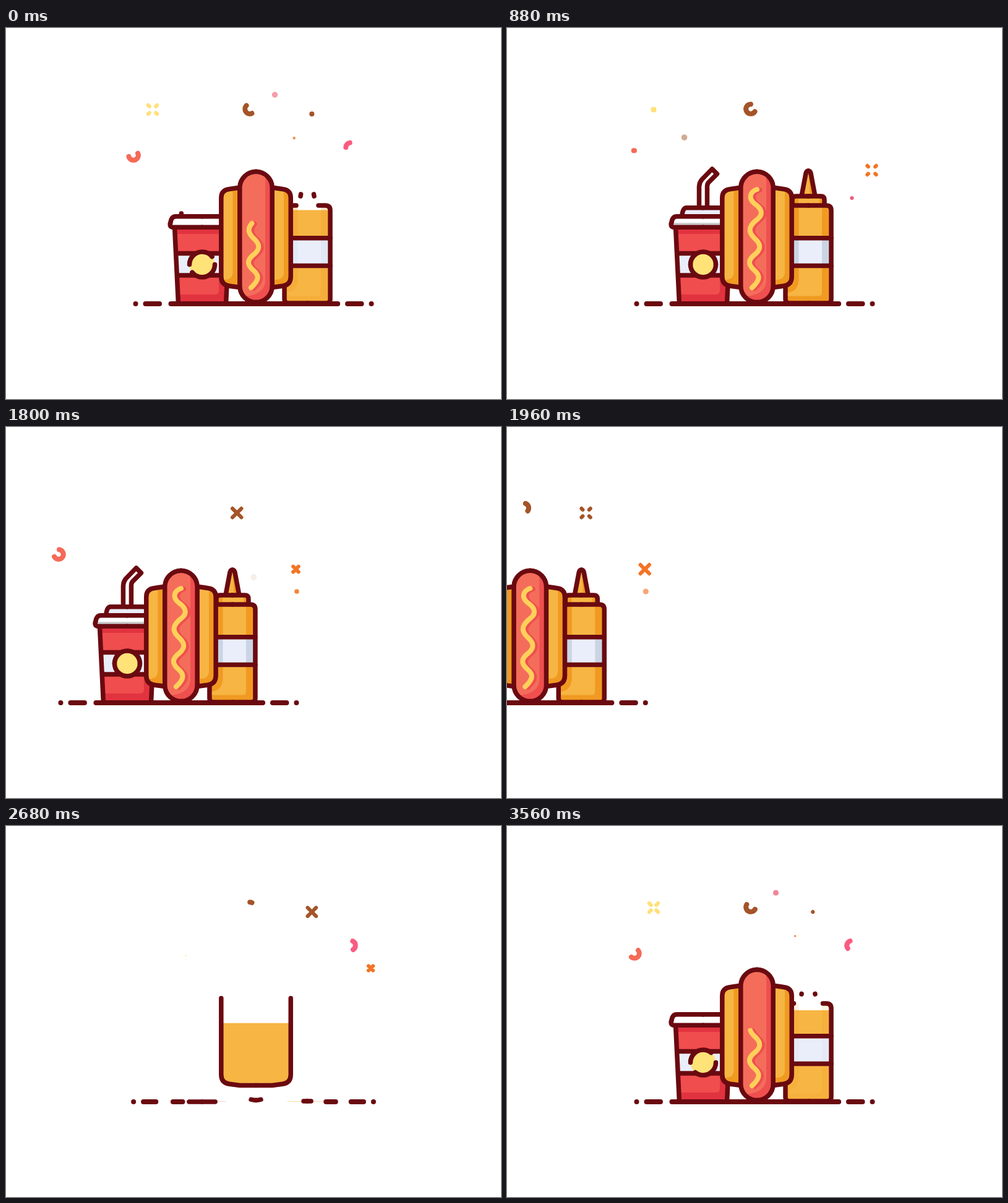
Animation, 800 px wide and 600 px high, one loop 3.6 s. Source, as an HTML page:

```html
<!DOCTYPE html>
<html lang="en">
<head>
<meta charset="utf-8">
<title>Hot dog lunch</title>
<style>
  html, body { margin: 0; width: 100%; height: 100%; overflow: hidden; background: #fff; }
  svg { display: block; width: 800px; height: 600px; }
  .ink { fill: none; stroke: #6a0a10; stroke-width: 7.5; stroke-linecap: round; stroke-linejoin: round; }
  .ground { stroke-width: 8; }
  .bun { fill: #f7b543; } .bun2 { fill: #f09a22; }
  .dog { fill: #f46d5b; } .dog2 { fill: #ef4f4f; }
  .red { fill: #f04d4e; } .red2 { fill: #e1333f; }
  .pale { fill: #eaeefa; } .pale2 { fill: #cad5e4; }
  .sauce { fill: none; stroke: #ffd05a; stroke-width: 8; stroke-linecap: round; }
</style>
</head>
<body>
<svg viewBox="0 0 800 600">
  <defs>
    <clipPath id="bun"><path d="M378 419.5H430L447 417.3Q460.2 415.5 460.2 402V275Q460.2 262 447 260.5L430 258H378L361 260.5Q347.8 262 347.8 275V402Q347.8 415.5 361 417.3Z"/></clipPath>
    <clipPath id="dog"><rect x="377.8" y="232.3" width="52.4" height="211.2" rx="26.2"/></clipPath>
    <clipPath id="cup"><path d="M272.5 322H361.5L355.5 446H278.5Z"/></clipPath>
    <clipPath id="cupLevel"><rect x="260" y="322" width="120" height="124" data-rise="2680 3290"/></clipPath>
    <clipPath id="bottle"><rect x="450" y="287" width="74" height="159" rx="7"/></clipPath>
    <clipPath id="bottleLevel"><rect x="440" y="287" width="100" height="161" data-rise="2670 3740 1.5"/></clipPath>
    <clipPath id="nozzle"><path d="M476 272L483 235Q484 231 487 231Q490 231 491 235L498 272Z"/></clipPath>
  </defs>
  <g id="scene">
    <g id="confetti"></g>

    <!-- drink -->
    <path class="ink" data-draw="4000 4400" d="M310.5 290V258Q310.5 250 315 245L331.5 228L339.5 236L326 249.500Q323.500 252 323.500 257V290"/>
    <path class="pale" data-fade="3700 4000" d="M283 304Q284 291 290 290.700H351V304Z"/>
    <path class="ink" data-mir="317" data-draw="3580 3900" d="M283 303Q284 291 290 290.700H317"/>
    <g clip-path="url(#cup)">
      <g clip-path="url(#cupLevel)">
        <rect class="red" x="260" y="320" width="120" height="130"/>
        <rect class="pale" x="260" y="364.500" width="120" height="35.500"/>
      </g>
      <g data-fade="3250 3500">
        <path class="red2" d="M260 320H380V364H344V333H260ZM344 400H380V446H260V431H338Q344 431 344 424Z"/>
        <rect class="pale2" x="344" y="364" width="30" height="36"/>
      </g>
    </g>
    <path class="ink" data-draw="2950 3260" d="M277 400H358"/>
    <path class="ink" data-draw="3000 3360" d="M360 364.500H275"/>
    <path class="ink" data-mir="317" data-draw="2580 3360" d="M317 446H355.500L361.500 322"/>
    <path fill="#fff" data-fade="3300 3480" d="M269 322L265.500 316L268 307L274 304.800H350V322Z"/>
    <path fill="#ccc" data-fade="3650 4000" d="M266 315H350V322H268Z"/>
    <path class="ink" data-mir="317" data-draw="3150 3500" d="M317 322.300H270Q264 322 265.500 316"/>
    <path class="ink" data-mir="317" data-draw="3180 3500" d="M317 304.800H274Q269 305 267 310L265.500 316"/>
    <circle cx="317" cy="382.500" r="20.500" fill="#ffe378" data-fade="3090 3400"/>
    <path class="ink" data-draw="3160 3720" d="M296.500 382.500A20.500 20.500 0 0 1 337.500 382.500"/>
    <path class="ink" data-draw="3160 3720" d="M337.500 382.500A20.500 20.500 0 0 1 296.500 382.500"/>

    <!-- mustard bottle -->
    <g clip-path="url(#nozzle)" data-fade="3750 4000">
      <rect class="bun" x="470" y="228" width="34" height="46"/>
      <path class="bun2" d="M487 228H504V274H490Z"/>
    </g>
    <path class="ink" data-mir="487" data-draw="3550 3980 .6" d="M498 272L491 235Q490 231 487 231"/>
    <g data-fade="3700 3950">
      <rect class="bun" x="461" y="272" width="52" height="16" rx="5"/>
      <path class="bun2" d="M461 273H471V288H461ZM505 273H512V288H505Z"/>
    </g>
    <path class="ink" data-mir="487" data-draw="3610 3980" d="M487 272H507Q513 272 513 278V287"/>
    <g clip-path="url(#bottle)">
      <g clip-path="url(#bottleLevel)">
        <rect class="bun" x="445" y="285" width="85" height="165"/>
        <rect class="pale" x="445" y="340" width="85" height="44.500"/>
      </g>
      <g data-fade="3500 3900">
        <path class="bun2" d="M445 285H471.500V408Q470 427 452 428H445ZM509 285H530V450H445V433.500H504Q509 433.500 509 428Z"/>
        <rect class="pale" x="445" y="340" width="85" height="44.500"/>
        <path class="pale2" d="M445 340H471.500V384.500H445ZM509 340H530V384.500H509Z"/>
      </g>
    </g>
    <path class="ink" data-draw="2900 3150" d="M450 384.500H524"/>
    <path class="ink" data-draw="3140 3420" d="M450 339.700H524"/>
    <path class="ink" data-mir="487" data-draw="2660 3800 1.45" d="M487 445H518Q524 445 524 439V295Q524 287 516 287H487"/>

    <!-- hot dog -->
    <g clip-path="url(#bun)">
      <rect class="bun" x="345" y="257" width="120" height="163" data-rise="2420 2840"/>
      <g class="bun2" data-fade="2850 3100">
        <path d="M366.500 262V396Q366 406 355 407H345V422H381V262Z"/>
        <path d="M449 257V396Q448.500 406 437.500 407H427V422H465V257Z"/>
      </g>
    </g>
    <path class="ink" data-mir="404" data-draw="2380 2790" d="M404 419.500H430L447 417.300Q460.200 415.500 460.200 402V275Q460.200 262 447 260.500L430 258H404"/>
    <g clip-path="url(#dog)">
      <rect class="dog" x="375" y="232" width="60" height="212" data-rise="2680 3300"/>
      <path class="dog2" data-fade="3290 3500" d="M419 225V410Q417 432 384 434V450H440V225Z"/>
    </g>
    <path class="sauce" style="stroke:#ef4f4f" transform="translate(4.500 1)" data-draw="3290 3780" d="M396 420C410 407 409 400 400 392C388 382 390 374 402 365C413 355 408 347 399 339C388 328 392 319 405 309C416 300 410 291 400 284C390 276 392 265 404 261"/>
    <path class="sauce" data-draw="3290 3780" d="M396 420C410 407 409 400 400 392C388 382 390 374 402 365C413 355 408 347 399 339C388 328 392 319 405 309C416 300 410 291 400 284C390 276 392 265 404 261"/>
    <path class="ink" data-mir="404" data-draw="2660 3285" d="M404 443.500A26.200 26.200 0 0 0 430.200 417.300V258.500A26.200 26.200 0 0 0 404 232.300"/>

    <!-- ground -->
    <g data-mir="400"><g data-slide="-16">
      <path class="ink ground" data-draw="2240 2300" d="M209.500 446h.02"/>
      <path class="ink ground" data-draw="2340 2720" d="M225.500 446H248"/>
    </g></g>
    <g data-mir="401.3"><g data-slide="16">
      <path class="ink ground" data-draw="2640 3000" d="M266.500 446H402"/>
    </g></g>
  </g>
</svg>
<script>
const LOOP = 3600, RESET = 2200, LEAVE = 5200, LEAVE_MS = 760;
const $$ = sel => [...document.querySelectorAll(sel)];
const scene = document.getElementById('scene');
const confetti = document.getElementById('confetti');
const clamp = x => Math.min(1, Math.max(0, x));
const out = (x, k) => 1 - Math.pow(1 - x, k);

// Scene time runs from RESET to RESET + LOOP: build up, hold, leave.
const sceneTime = t => t < RESET ? t + LOOP : t;

function make(tag, attrs) {
  const el = document.createElementNS('http://www.w3.org/2000/svg', tag);
  for (const k in attrs) el.setAttribute(k, attrs[k]);
  confetti.append(el);
  return el;
}

for (const el of $$('[data-mir]')) {
  const g = make('g', { transform: `matrix(-1 0 0 1 ${2 * el.dataset.mir} 0)` });
  g.append(el.cloneNode(true));
  el.after(g);
}

const tracks = [];
function track(kind, apply) {
  for (const el of $$(`[data-${kind}]`)) {
    const [from, to, k = 1] = el.dataset[kind].split(' ').map(Number);
    const set = apply(el);
    tracks.push(u => set(out(clamp((u - from) / (to - from)), k), u >= from));
  }
}

track('draw', el => {
  el.setAttribute('pathLength', 1);
  return (p, on) => {
    el.style.visibility = on ? 'visible' : 'hidden';
    el.style.strokeDasharray = p < 1 ? `${p} 2` : 'none';
  };
});
track('fade', el => p => { el.style.opacity = p; });
track('rise', el => {
  const y = +el.getAttribute('y'), h = +el.getAttribute('height');
  return p => {
    el.setAttribute('y', y + h * (1 - p));
    el.setAttribute('height', h * p);
  };
});
for (const el of $$('[data-slide]')) {
  tracks.push(u => {
    const rest = Math.pow(1 - clamp((u - 2240) / 660), 1.4);
    el.setAttribute('transform', `translate(${el.dataset.slide * rest} 0)`);
  });
}

// Confetti: each piece gets its age while alive.
function piece(starts, life, el, set) {
  for (const s of starts) {
    const born = sceneTime(s), node = el();
    tracks.push(u => {
      const age = u - born, on = age >= 0 && age < life;
      node.style.display = on ? '' : 'none';
      if (on) set(node, age);
    });
  }
}

function curl(cx, cy, color, ...starts) {
  const at = deg => {
    const a = deg * Math.PI / 180;
    return `${cx + 7.8 * Math.cos(a)} ${cy + 7.8 * Math.sin(a)}`;
  };
  piece(starts, 1170,
    () => make('path', { fill: 'none', stroke: color, 'stroke-width': 8, 'stroke-linecap': 'round' }),
    (el, age) => {
      const x = clamp(age / 1160);
      const tail = 270 + 720 * Math.pow(x, 1.65);
      const head = Math.max(tail + .3, 270 + 720 * out(x, 1.65));
      el.setAttribute('d', `M${at(tail)}A7.8 7.8 0 ${head - tail > 180 ? 1 : 0} 1 ${at(head)}`);
    });
}

function cross(cx, cy, color, ...starts) {
  piece(starts, 680,
    () => make('path', { stroke: color, 'stroke-linecap': 'round' }),
    (el, age) => {
      const far = 7.2 * clamp(age / 340), near = 7 * clamp((age - 340) / 300);
      let d = '';
      for (const sx of [-1, 1]) for (const sy of [-1, 1])
        d += `M${cx + sx * near} ${cy + sy * near}L${cx + sx * far} ${cy + sy * far}`;
      el.setAttribute('d', d);
      el.setAttribute('stroke-width', 6 * clamp((680 - age) / 60));
    });
}

function dot(cx, cy, color, start) {
  piece([start], 800, () => make('circle', { cx, cy, fill: color }), (el, age) => {
    const x = age / 800;
    el.setAttribute('r', 5 * out(x, 2));
    el.setAttribute('opacity', clamp(2.5 * (1 - x)));
  });
}

const BROWN = '#a45428', ORANGE = '#f47425', YELLOW = '#ffe07a', PINK = '#fb5b80', RED = '#f56a58';
curl(394, 131, BROWN, 484, 1832, 2655);
curl(206, 206, RED, 1029, 3330);
curl(557, 193.3, PINK, 2529);
cross(237, 132, YELLOW, 820, 3040);
cross(494.3, 139, BROWN, 1400, 2360, 3560);
cross(589.5, 230, ORANGE, 300, 1600, 2510);
dot(434.5, 108, '#ee5570', 2988);
dot(465.7, 178, '#f58a4a', 3400);
dot(286.6, 177, BROWN, 240);
dot(557.4, 275, '#f25a78', 584);
dot(521.5, 243, BROWN, 1032);
dot(591, 266, '#f5853c', 1394);
dot(290.5, 209.4, YELLOW, 2595);

// cubic-bezier(.4, 0, .6, 1)
function inOut(x) {
  let lo = 0, hi = 1;
  for (let i = 0; i < 24; i++) {
    const s = (lo + hi) / 2, r = 1 - s;
    if (1.2 * r * r * s + 1.8 * r * s * s + s * s * s < x) lo = s; else hi = s;
  }
  return lo * lo * (3 - 2 * lo);
}

const begin = performance.now();
function frame(now) {
  const u = sceneTime(Math.max(0, now - begin) % LOOP);
  for (const run of tracks) run(u);
  scene.setAttribute('transform', `translate(${-800 * inOut(clamp((u - LEAVE) / LEAVE_MS))} 0)`);
  requestAnimationFrame(frame);
}
frame(begin);
</script>
</body>
</html>
```
